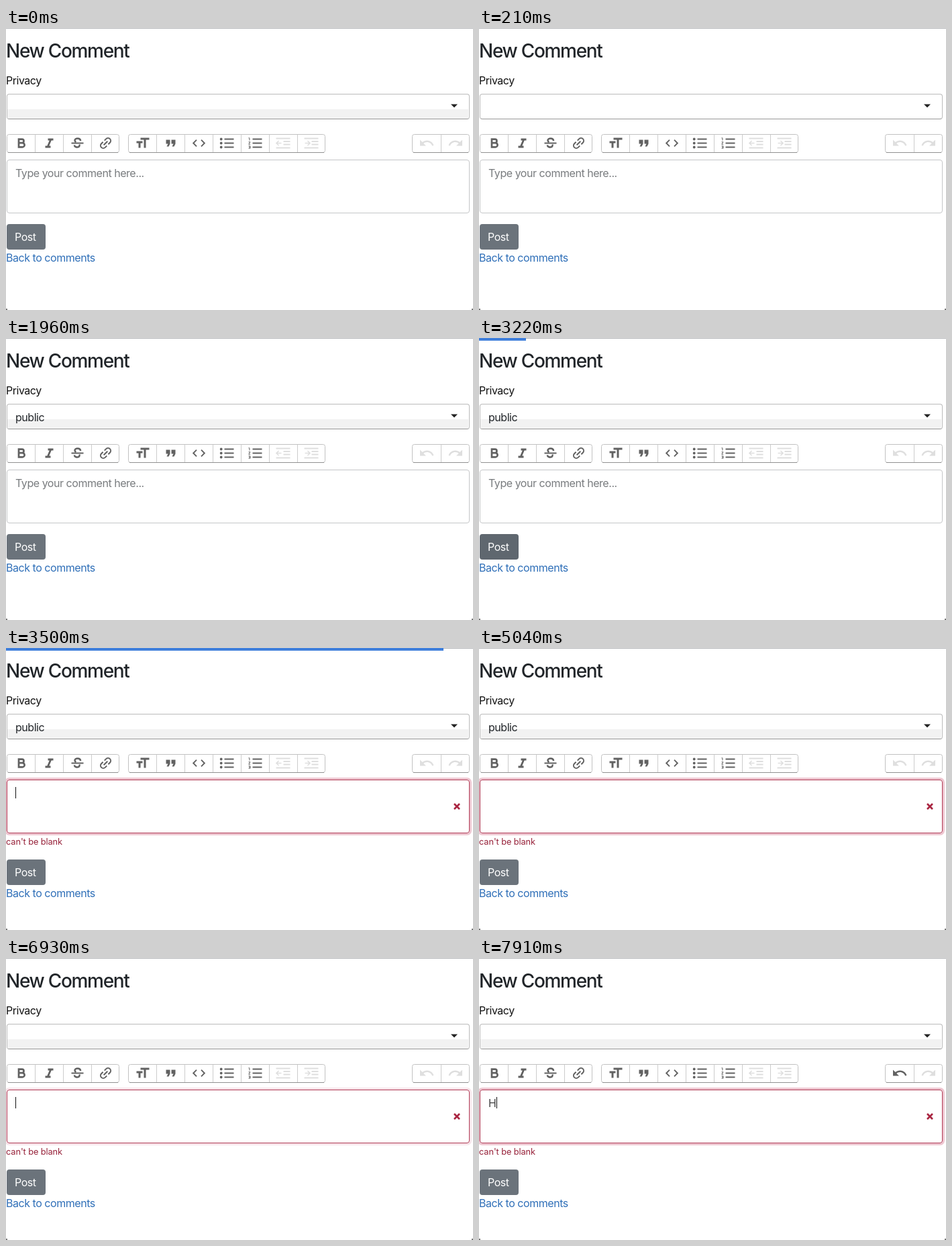
An HTML page that plays this animation: 696x420 px, repeating every 8 s.

```html
<!DOCTYPE html>
<html lang="en">
<head>
<meta charset="utf-8">
<title>New Comment</title>
<style>
html, body { margin: 0; width: 100%; height: 100%; overflow: hidden; background: #fff; }
#stage {
  position: relative; width: 696px; height: 420px; overflow: hidden; background: #fff;
  font: 16px/24px Inter, "Open Sans", sans-serif; font-optical-sizing: none;
  letter-spacing: -.46px; color: #212529; white-space: nowrap;
}
#stage div, #stage svg { position: absolute; box-sizing: border-box; }
.edge { left: 0; top: 0; width: 696px; height: 1px; background: #b4b6b8; }
.corner { top: 418px; width: 2px; height: 2px; background: #777; }
#bar { left: 0; top: 0; height: 4px; background: #3f7fdb; }
#title { left: 0; top: 17px; font-size: 28px; line-height: 34px; font-weight: 500; letter-spacing: -1.3px; }
#select, #editor { left: 1px; width: 690px; border: 1px solid #c4c6c8; border-radius: 4px; }
#select { top: 98px; height: 38px; border-color: #bbb #bbb #999; }
#strip { left: 0; top: 22px; width: 687px; height: 14px; background: #f2f2f2; border-radius: 0 0 3px 3px; }
#editor { top: 196px; height: 80px; }
#menu {
  left: 1px; top: 138px; width: 690px; height: 72px; background: #fff;
  border: 1px solid #dcdcdc; border-radius: 4px; box-shadow: 0 6px 12px rgba(0,0,0,.175);
}
.caret { width: 1px; background: #111; }
#error { left: 0; top: 277px; font-size: 12.8px; letter-spacing: -.1px; color: #97223a; }
#post { left: 1px; top: 292px; width: 58px; height: 38px; padding: 7px 12px; border-radius: 4px; color: #fff; }
#back { left: 0; top: 330px; color: #2f6fb8; }
#tools { left: 0; top: 150px; }
</style>
</head>
<body>
<div id="stage">
  <div class="edge"></div>
  <div class="corner" style="left:0"></div>
  <div class="corner" style="left:694px"></div>
  <div id="bar"></div>
  <div id="title">New Comment</div>
  <div style="left:0;top:66px;color:#111">Privacy</div>
  <div id="select">
    <div id="strip"></div>
    <div id="value" style="left:12px;top:7px">public</div>
    <div class="caret" id="selectCaret" style="top:10px;height:17px"></div>
    <svg style="left:661px;top:14px" width="10" height="6"><path id="arrow" fill="#222"/></svg>
  </div>
  <svg id="tools" width="696" height="40"></svg>
  <div id="editor">
    <div id="hint" style="left:12px;top:7px;color:#787b7e">Type your comment here...</div>
    <div id="typed" style="left:12px;top:7px;color:#444">H</div>
    <div class="caret" id="editorCaret" style="top:10px;height:17px"></div>
    <svg id="cross" style="left:665px;top:34px" width="10" height="10"><path d="M1 1l8 8M9 1l-8 8" stroke="#a92440" stroke-width="2.6"/></svg>
  </div>
  <div id="error">can't be blank</div>
  <div id="post">Post</div>
  <div id="back">Back to comments</div>
  <div id="menu">
    <div style="left:12px;top:8px;color:#000">public</div>
    <div style="left:12px;top:38px;color:#333">private</div>
  </div>
</div>
<script>
const $ = id => document.getElementById(id);
const LOOP = 8000;

// Toolbar icons on a 24-unit grid; "fill" or "stroke" drawing.
const fill = d => `<path d="${d}"/>`;
const stroke = (d, width = 2, extra = '') =>
  `<path d="${d}" fill="none" stroke="#000" stroke-width="${width}" ${extra}/>`;
const indent = arrow => fill('M1 4h21v2H1zM12 8.5h10v2H12zM12 13h10v2H12zM1 18h21v2H1z') +
  stroke(arrow + 'M2 12h7', 1.6);
const undoPath = fill('M12.5 8c-2.65 0-5.05.99-6.9 2.6L2 7v9h9l-3.62-3.62c1.39-1.16 3.16-1.88 5.12-1.88 3.54 0 6.55 2.31 7.6 5.5l2.37-.78C21.08 11.03 17.15 8 12.5 8z');
const listBars = fill('M8 5h14v2H8zM8 11h14v2H8zM8 17h14v2H8z');
const icons = {
  bold: stroke('M8.5 6.2h4.8a2.7 2.7 0 0 1 0 5.4H8.5h5.5a3.1 3.1 0 0 1 0 6.2H8.5z', 2.7),
  italic: fill('M10 5v3h2.2l-3.4 8H6v3h8v-3h-2.2l3.4-8H18V5z'),
  strike: stroke('M16.6 8.6C16.4 3.6 7.8 4 8 8q.1 1.6 2 2.4M14.8 14c2.2 5-7 5.6-7.4.9', 2.5) + fill('M3 11h18v2H3z'),
  link: `<g transform="rotate(-45 12 12)">${stroke('M10.5 8H7a4 4 0 0 0 0 8h3.5M13.5 8H17a4 4 0 0 1 0 8h-3.5M8 12h8')}</g>`,
  heading: fill('M9 4v3h5v12h3V7h5V4H9zm-6 8h3v7h3v-7h3V9H3z'),
  quote: fill('M6 17h3l2-4V7H5v6h3zm8 0h3l2-4V7h-6v6h3z'),
  code: stroke('M8.5 7.2L3.7 12l4.8 4.8M15.5 7.2l4.8 4.8-4.8 4.8', 1.9),
  bullets: listBars + [6, 12, 18].map(y => `<circle cx="3.2" cy="${y}" r="1.9"/>`).join(''),
  numbers: listBars + stroke('M2 4.3h1.4V8M2 10.3h2.5L2.2 13.7h2.5M2 16.3h2.5v3.4H2M2.6 18h1.9', 1),
  outdent: indent('M5 8.5L1.5 12 5 15.5'),
  indent: indent('M6 8.5L9.5 12 6 15.5'),
  undo: undoPath,
  redo: `<g transform="matrix(-1 0 0 1 24 0)">${undoPath}</g>`
};
const disabled = ['outdent', 'indent', 'undo', 'redo'];

function toolGroup(x, width, names) {
  const step = width / names.length;
  const frame = `<rect x="${x + .5}" y="8.5" width="${width - 1}" height="27" rx="3" fill="#fff" stroke="#c2c2c2"/>
    <path d="M${x + 2} 35.5h${width - 4}" stroke="#909090"/>`;
  return frame + names.map((name, i) => {
    const left = Math.round(x + i * step);
    const divider = i ? `<path d="M${left + .5} 9v26" stroke="#ccc"/>` : '';
    return `${divider}<g id="${name}" opacity="${disabled.includes(name) ? .125 : .62}"
      transform="translate(${x + (i + .5) * step - 11.5} 9.5)">${icons[name]}</g>`;
  }).join('');
}
$('tools').innerHTML =
  toolGroup(1, 168, ['bold', 'italic', 'strike', 'link']) +
  toolGroup(182, 294, ['heading', 'quote', 'code', 'bullets', 'numbers', 'outdent', 'indent']) +
  toolGroup(605, 86, ['undo', 'redo']);

const during = (t, ...spans) => spans.some(([from, to]) => t >= from && t < to);
const ramp = (t, from, length) => Math.min(1, Math.max(0, (t - from) / length));
const smooth = p => p * p * (3 - 2 * p);
const show = (id, visible) => { $(id).style.display = visible ? 'block' : 'none'; };

function render(t) {
  const selectFocused = during(t, [140, 1820], [5110, 6860]);
  const open = during(t, [560, 1820], [5110, 6860]);
  const chosen = during(t, [1820, 5390]);
  const invalid = t >= 3290;
  const editing = during(t, [3290, 5110], [6860, LOOP]);
  const typed = t >= 7910;

  show('strip', !selectFocused);
  show('value', chosen);
  show('menu', open);
  $('arrow').setAttribute('d', open ? 'M0 5.5h10L5 .5z' : 'M0 .5h10L5 5.5z');
  show('selectCaret', during(t, [420, 910], [1470, 1820], [5180, 5670], [6160, 6660]));
  $('selectCaret').style.left = (chosen ? 57 : 12) + 'px';

  show('hint', !editing);
  show('typed', typed);
  show('editorCaret', during(t, [3290, 3790], [4270, 4760], [6930, 7420], [7910, LOOP]));
  $('editorCaret').style.left = (typed ? 24 : 12) + 'px';
  $('undo').setAttribute('opacity', typed ? .62 : .125);

  const glow = smooth(ramp(t, 3290, 150)) - smooth(ramp(t, 5110, 150)) + smooth(ramp(t, 6860, 150));
  $('editor').style.borderColor = invalid ? '#b03a55' : '';
  $('editor').style.boxShadow = `0 0 0 3px rgba(190,40,80,${.26 * glow})`;
  show('cross', invalid);
  show('error', invalid);
  $('post').style.top = (invalid ? 315 : 292) + 'px';
  $('back').style.top = (invalid ? 353 : 330) + 'px';
  $('post').style.background = during(t, [2660, 3290]) ? '#5f676f' : '#6b737b';

  show('bar', during(t, [3150, 3800]));
  const load = 1 - (1 - ramp(t, 3270, 300)) ** 1.8;
  $('bar').style.width = 10 + 90 * load + '%';
  $('bar').style.opacity = 1 - ramp(t, 3640, 150) ** 2;
}

const start = performance.now();
function tick() {
  render((performance.now() - start) % LOOP);
  requestAnimationFrame(tick);
}
tick();
</script>
</body>
</html>
```
